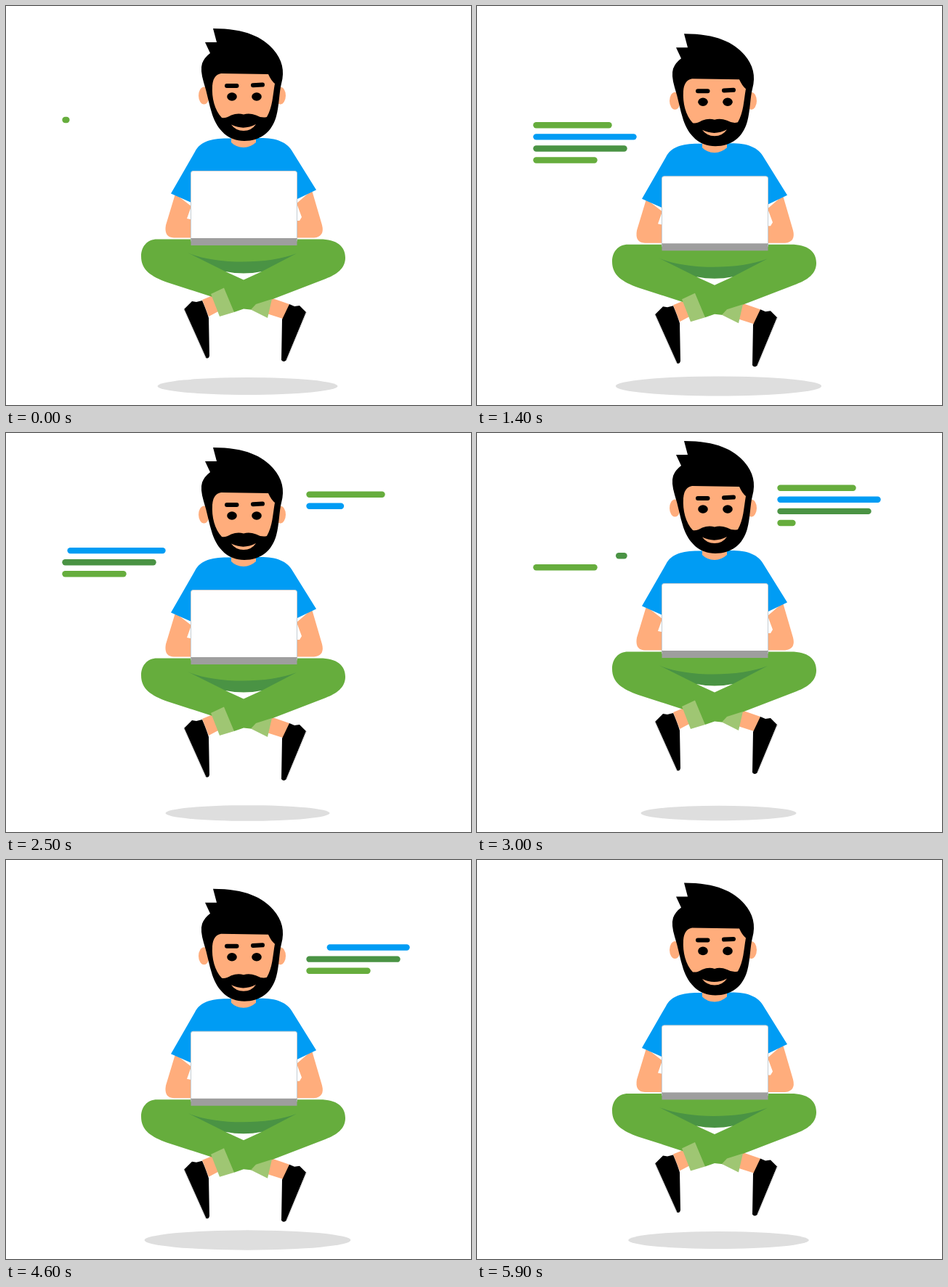
Animation, 640 px wide and 550 px high, one loop 6000 ms. Source, as an HTML page:

```html
<!DOCTYPE html>
<html lang="en">
<head>
<meta charset="utf-8">
<title>Floating coder</title>
<style>
html, body { margin: 0; width: 100%; height: 100%; overflow: hidden; background: #fff; }
svg { display: block; width: 100vw; height: 100vh; }
.skin { fill: #ffad7c; }
.shirt { fill: #009cf4; }
.pants { fill: #66ad3d; }
.cuff { fill: #9fc673; }
.bar { fill: none; stroke-width: 8.4; stroke-linecap: round; }
.brow { fill: none; stroke: #000; stroke-width: 6; stroke-linecap: round; }
.sole { fill: none; stroke: #c9c9c9; stroke-width: 1; }
</style>
</head>
<body>
<svg viewBox="0 0 640 550">
  <ellipse id="shadow" cx="332.5" cy="524" fill="#dedede"/>
  <g id="float">
    <g id="bars"></g>

    <!-- feet -->
    <path class="skin" d="M270 405L287 398L294 420L279 428Z M364 402L390 411L384 432L359 424Z"/>
    <path d="M245 418L256 407L262 408L270 406Q276 420 279 430L280 482Q279 487 275 485Z"/>
    <path d="M390 411L397 414L404 413L413 422L386 488Q382 492 379 488L380 432Z"/>
    <path class="sole" d="M245 418L275 485M413.5 422L386 488"/>

    <!-- legs -->
    <path class="pants" d="M208 321.500H432C455 321.500 467 331 467 347C467 362 455 370 440 376L366 404.500L341 419L327 417.500L314 422L294 404L284 401L222 381C200 373 186 364 186 345C186 332 194 321.500 208 321.500Z"/>
    <path fill="#4a9344" d="M250 340C285 356 360 357 400 341L352 366Q327 371 302 366Z"/>
    <path fill="#fff" d="M302 366Q327 371 352 366L327 377.500Z"/>
    <path class="cuff" d="M282 397L300 388.500L314 422L294 428Z M337 418.500L344 411L366 404L360 430Z"/>

    <!-- arms and shirt -->
    <path class="skin" d="M233 259L220 302Q217 319 231 319.500H256V294.500L249 293L255 276Z"/>
    <path class="skin" d="M421 254L435 302Q439 318 424 319.500H399V296H404L407 291L400 272Z"/>
    <path class="shirt" d="M304 182.500C282 182.500 267 187 260 201L227 258.500L254 270.500V300H401V266L427 253.500L395 202C387 187 372 182 350 182Z"/>
    <path class="skin" d="M310 178H344V188Q337 194.500 327 195Q316 194.500 310 188Z"/>

    <!-- laptop -->
    <rect x="254.500" y="227.500" width="146" height="98" rx="3" fill="#fff" stroke="#c4cdd3" stroke-width="1"/>
    <rect x="254.500" y="320" width="146" height="10" fill="#9e9e9e"/>

    <!-- head -->
    <ellipse class="skin" cx="272.500" cy="123.500" rx="7.500" ry="12"/>
    <ellipse class="skin" cx="377.500" cy="123.500" rx="7.500" ry="12"/>
    <path d="M285 31C330 31 353 43 368 60C380 74 384 89 379 107C376 118 376 138 372 152C366 174 350 186 328 186C306 186 291 171 284 150C279 135 277 120 272 105Q267 88 270 79Q273 71 281 65L274 50H290Z"/>
    <path class="skin" d="M284 110Q285 95 296 93L361 94Q365 103 370 107C367 124 367 139 359 153Q352 155 344 150.500Q335 147 327 149.500Q319 147 310 150.500Q303 155 297 154C287 143 283 127 284 110Z"/>
    <path class="skin" d="M310 163.500Q327 172 344 163Q338 172 327 172Q316 172 310 163.500Z"/>
    <path class="brow" d="M304 110H317.500M340 109.200L353 108.600"/>
    <ellipse class="eye" cx="311" cy="125" rx="6.800"/>
    <ellipse class="eye" cx="345" cy="125" rx="6.800"/>
  </g>
</svg>
<script>
const LOOP = 6000, FRAME = 100, CYCLE = 4000, DRAW = 265;

// One value per half second of the hover cycle
const bob = [0, 7.5, 12, 5.8, -1.2, -11, -20, -10];
const spread = [124, 138.5, 153.5, 138, 121.5, 113, 107, 114];

const rows = [
  { len: 100, color: "#66ad3d" },
  { len: 134, color: "#009cf4" },
  { len: 121, color: "#4a9344" },
  { len: 80, color: "#66ad3d" }
];
const blocks = [
  { x: 81.5, y: 157, start: -5, end: 2221 },
  { x: 417.5, y: 95.7, start: 2149, end: 4279 }
];

const $ = id => document.getElementById(id);
const clamp = v => Math.max(0, Math.min(1, v));
const eyes = document.querySelectorAll(".eye");

const bars = blocks.flatMap(b => rows.map((row, i) => {
  const el = document.createElementNS("http://www.w3.org/2000/svg", "path");
  el.setAttribute("class", "bar");
  el.setAttribute("stroke", row.color);
  $("bars").append(el);
  return {
    el, x: b.x, y: b.y + i * 16.1, len: row.len,
    start: b.start + i * DRAW, end: b.end + i * DRAW
  };
}));

// Closed Catmull-Rom curve through evenly spaced values
function curve(points, t) {
  const n = points.length;
  const pos = (t % CYCLE) / CYCLE * n;
  const i = Math.floor(pos), u = pos - i;
  const [a, b, c, d] = [-1, 0, 1, 2].map(k => points[(i + k + n) % n]);
  return b + u / 2 * (c - a + u * (2 * a - 5 * b + 4 * c - d + u * (3 * (b - c) + d - a)));
}

function render(t) {
  $("float").setAttribute("transform", `translate(0 ${curve(bob, t).toFixed(2)})`);

  const rx = curve(spread, t);
  $("shadow").setAttribute("rx", rx);
  $("shadow").setAttribute("ry", rx * 0.096);

  for (const bar of bars) {
    const head = clamp((t - bar.start) / DRAW) * bar.len;
    const tail = clamp((t - bar.end) / DRAW) * bar.len;
    const shown = t >= bar.start && t < bar.end + DRAW;
    bar.el.setAttribute("visibility", shown ? "visible" : "hidden");
    bar.el.setAttribute("d", `M${bar.x + tail} ${bar.y}H${bar.x + Math.max(head, tail + 0.1)}`);
  }

  const blink = clamp(1 - Math.abs(t - 800) / 150);
  eyes.forEach(eye => eye.setAttribute("ry", 5.8 - 3.5 * blink));
}

function tick() {
  const t = performance.now() % LOOP;
  render(Math.floor(t / FRAME) * FRAME);
  requestAnimationFrame(tick);
}
render(0);
requestAnimationFrame(tick);
</script>
</body>
</html>
```
